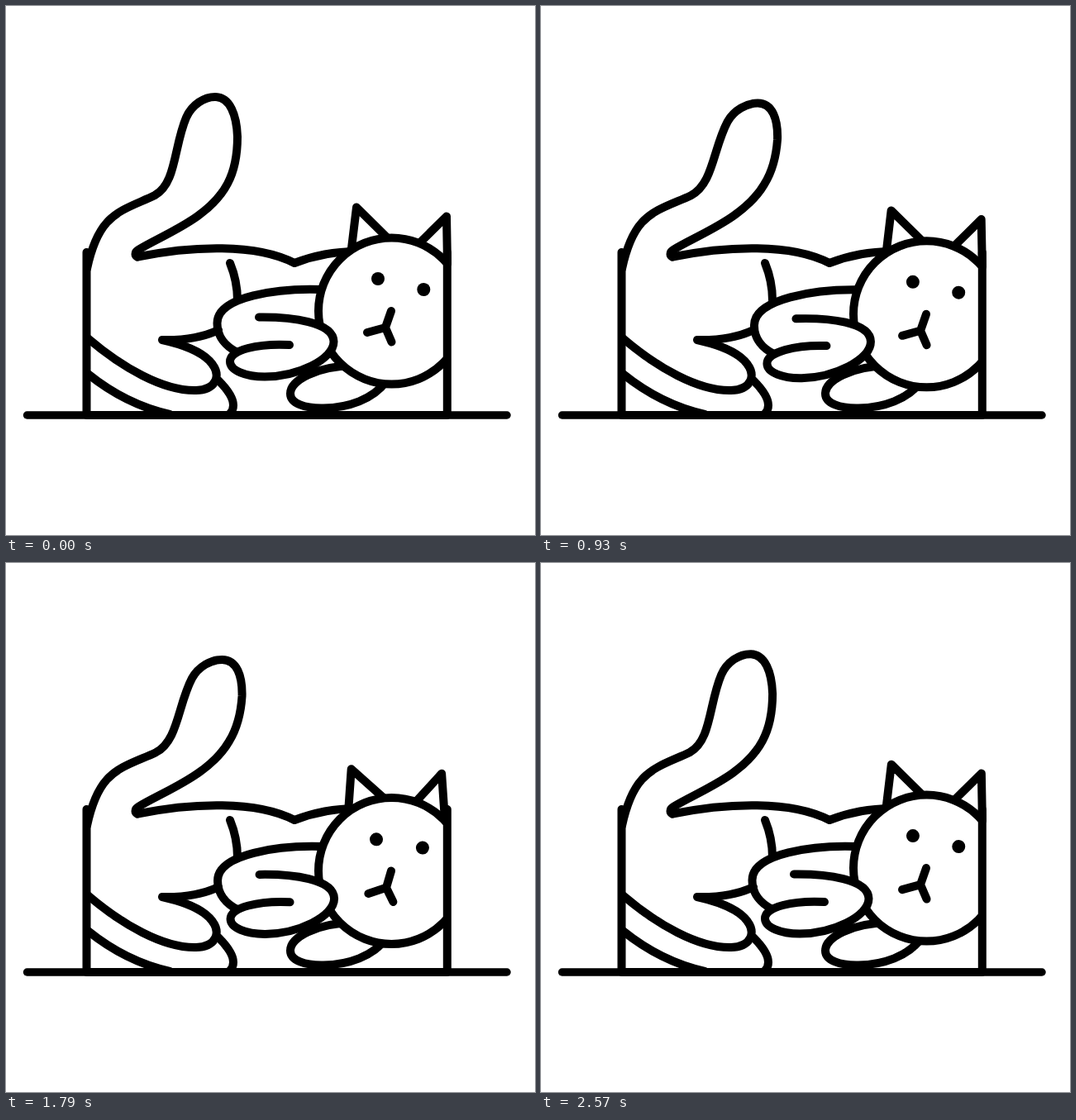
Recreate the animation shown at these times as an HTML page. Size 640 by 640 pixels, loop 2640 ms.

```html
<!DOCTYPE html>
<html lang="en">
<head>
<meta charset="utf-8">
<title>Sleepy cat</title>
<style>
  html, body { margin: 0; height: 100%; overflow: hidden; background: #fff; }
  svg { display: block; width: 100%; height: 100%; }
  .lines { fill: none; stroke: #000; stroke-width: 10; stroke-linecap: round; stroke-linejoin: round; }
  .solid { fill: #fff; }
  .eyes { fill: #000; stroke: none; }
</style>
</head>
<body>
<svg viewBox="0 0 640 640">
  <clipPath id="box"><rect width="534" height="640"/></clipPath>
  <g class="lines">
    <path id="tail" d="M98 318C104 290 113 272 122 262C137 245 160 239 180 229C206 215 203 170 218 135
      C225 119 240 110 253 110C271 110 279 132 280 158C280 182 276 200 268 215
      C246 257 191 276 160 295C155 298 156 303 159 303.5"/>
    <!-- back, belly, hind legs and lower front paw -->
    <path d="M159 303.5C225 290 303 287 349 311Q385 297 424 297"/>
    <path d="M271 311Q280 333 280 356"/>
    <path d="M99 402C140 437 190 466 230 465C255 464 262 446 246 429C233 416 212 409 189 404Q229 405 257 392"/>
    <path d="M99 445Q145 482 198 494"/>
    <path d="M257 453C268 464 275 474 275 483Q275 489 271 493"/>
    <path d="M420 435C375 436 344 453 344 469C344 481 362 487 384 486.5C414 486 444 476 460 454"/>
    <path id="arm" d="M383 343C330 341 255 351 255.5 384C255.5 400 266 412 280 419"/>
    <path id="ears" d="M418 293L424 243.5L463 282M500 287L533 254.5L534 312"/>
    <g clip-path="url(#box)"><circle id="skull" class="solid" cx="466.5" cy="369" r="88.5"/></g>
    <g id="face">
      <g class="eyes"><circle cx="450" cy="330" r="8"/><circle cx="505.3" cy="343" r="8"/></g>
      <path d="M466 369L459 389L437 395M459 389L466.5 406.5"/>
    </g>
    <path id="paw" class="solid" d="M306 376.5C345 376 396 382 396.5 406C396.5 428 352 448.5 313 448.5
      C290 448.5 271 441 271 430C271 416 305 408 343 410"/>
    <path d="M97.5 298V495H533.8V298"/>
    <path d="M25.5 495H606" stroke-width="9.5"/>
  </g>
</svg>
<script>
  const LOOP = 2640;
  const $ = id => document.getElementById(id);

  // Returns a function that moves every point of a path by rule(x, y, amount).
  function bendable(id, rule) {
    const path = $(id), rest = path.getAttribute('d');
    return amount => path.setAttribute('d', rest.replace(/([\d.]+) ([\d.]+)/g, (_, x, y) => {
      const [dx, dy] = rule(+x, +y, amount);
      return `${+x + dx} ${+y + dy}`;
    }));
  }

  // The tail bends more towards its tip; the arm swings about the wrist.
  const bendTail = bendable('tail', (x, y, amount) => {
    const lift = Math.max(0, (250 - y) / 140);
    return [11 * lift * amount, 9 * lift ** 2 * amount];
  });
  const swing = (x, y, amount) => [3 * amount, (400 - x) / 42 * amount];
  const swingArm = bendable('arm', swing);
  const swingPaw = bendable('paw', swing);

  // Smooth 0 to 1 between two times.
  function ease(t, from, to) {
    const x = Math.min(1, Math.max(0, (t - from) / (to - from)));
    return (1 - Math.cos(Math.PI * x)) / 2;
  }

  function draw() {
    const t = performance.now() % LOOP;
    const sway = Math.sin(Math.PI * t / LOOP) ** 1.6;
    const stretch = ease(t, 0, 1300) - ease(t, 1490, 1910);
    const tilt = -3 * (ease(t, 760, 1930) - ease(t, 1930, LOOP));

    bendTail(sway);
    swingArm(stretch);
    swingPaw(stretch);

    const bob = `translate(0 ${4.5 * sway})`;
    $('skull').setAttribute('transform', bob);
    for (const id of ['ears', 'face']) {
      $(id).setAttribute('transform', `${bob} rotate(${tilt} 466.5 369)`);
    }
    requestAnimationFrame(draw);
  }
  draw();
</script>
</body>
</html>
```
